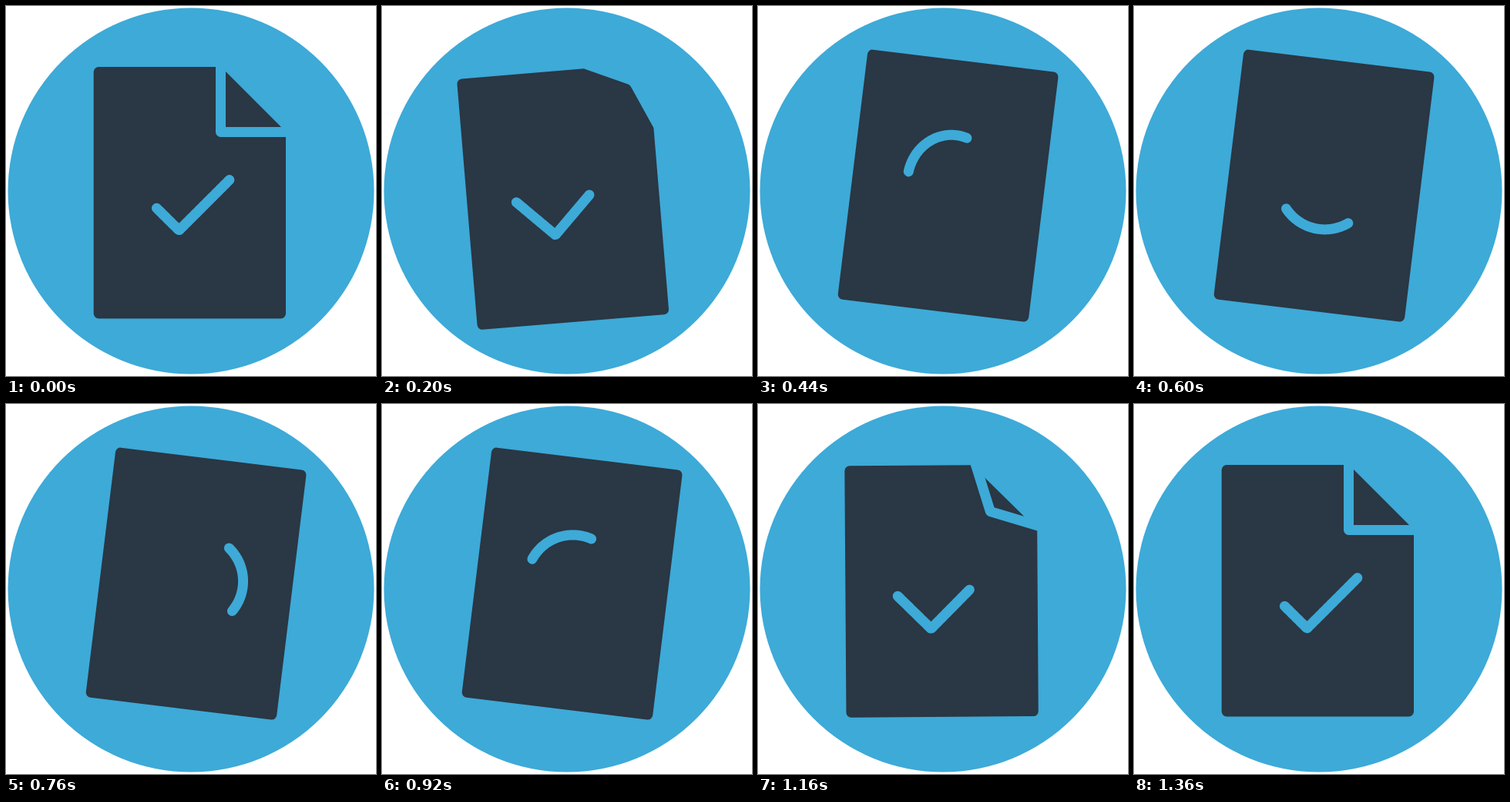
Animation, 480 px wide and 480 px high, one loop 1400 ms. Source, as an HTML page with a canvas:

```html
<!DOCTYPE html>
<html lang="en">
<head>
<meta charset="utf-8">
<title>Document check</title>
<style>
html, body { margin: 0; width: 100%; height: 100%; overflow: hidden; background: #fff; }
canvas { display: block; width: 480px; height: 480px; }
</style>
</head>
<body>
<canvas id="stage" width="480" height="480"></canvas>
<script>
const ctx = document.getElementById('stage').getContext('2d');
const BLUE = '#3daad8', DARK = '#2a3744';
const LOOP = 1400, STEP = 40, LINE = 13;
const RAD = Math.PI / 180;

const clamp = v => Math.min(1, Math.max(0, v));
const mix = (a, b, k) => a + (b - a) * k;
const ease = {
  lin: k => k,
  inOut: k => k * k * (3 - 2 * k),
  out: k => 1 - (1 - k) ** 2,
  out3: k => 1 - (1 - k) ** 3
};

// Track rows: [time, value, easing towards this row]
function track(rows, t) {
  for (let i = 1; i < rows.length; i++) {
    const [t0, v0] = rows[i - 1], [t1, v1, e = 'inOut'] = rows[i];
    if (t <= t1) return mix(v0, v1, ease[e](clamp((t - t0) / (t1 - t0))));
  }
  return rows[rows.length - 1][1];
}

const TILT = [[0, 0], [160, -6], [370, 7], [920, 7], [1050, -6], [1180, 0]];
const UNFOLD = [[40, 0], [400, 1, 'out'], [960, 1], [1268, 0]];

// Distance of both dash ends along the track; 0 is where the ring meets the tick
const TICK_TAIL = [[0, 22.6], [190, -2.5], [210, -2.5], [330, 85]];
const TICK_HEAD = [[0, 156], [190, 131.6], [210, 131.6], [330, 215]];
const TAIL = [[320, -609], [600, -342, 'lin'], [920, -119, 'lin'], [1160, 3, 'lin'], [1380, 22.6, 'out3']];
const HEAD = [[320, -496], [600, -251, 'lin'], [920, -30, 'lin'], [1160, 134.5, 'lin'], [1380, 156, 'out3']];

const RING = { x: 238.9, y: 239, r: 60, join: 173 };
const ELBOW = [224.5, 291];
const ENTRY = [RING.x + RING.r * Math.cos(RING.join * RAD), RING.y + RING.r * Math.sin(RING.join * RAD)];
const ARM = Math.hypot(ELBOW[0] - ENTRY[0], ELBOW[1] - ENTRY[1]);

function tickPoint(d) {
  if (d < ARM) return [mix(ENTRY[0], ELBOW[0], d / ARM), mix(ENTRY[1], ELBOW[1], d / ARM)];
  const s = (d - ARM) * Math.SQRT1_2;
  return [ELBOW[0] + s, ELBOW[1] - s];
}

// The ring starts as a narrow leaning ellipse and settles into a circle
function ringPoint(d, round) {
  const a = RING.join * RAD - d / RING.r;
  const x = mix(35, RING.r, round) * Math.cos(a);
  const y = mix(62, RING.r, round) * Math.sin(a);
  const lean = -5.2 * RAD * (1 - round), c = Math.cos(lean), s = Math.sin(lean);
  return [mix(252.5, RING.x, round) + x * c - y * s, mix(222, RING.y, round) + x * s + y * c];
}

function dashPoint(k, t) {
  if (t >= 320) {
    const d = mix(track(TAIL, t), track(HEAD, t), k);
    return d < 0 ? ringPoint(d, ease.inOut(clamp((t - 320) / 160))) : tickPoint(d);
  }
  const a = tickPoint(mix(track(TICK_TAIL, t), track(TICK_HEAD, t), k));
  const w = clamp((t - 200) / 120) ** 2;
  if (!w) return a;
  const b = ringPoint(mix(TAIL[0][1], HEAD[0][1], k), 0);
  return [mix(a[0], b[0], w), mix(a[1], b[1], w)];
}

function strokeLine(points, width, cap) {
  ctx.beginPath();
  for (const p of points) ctx.lineTo(...p);
  ctx.lineWidth = width;
  ctx.lineCap = cap;
  ctx.lineJoin = 'round';
  ctx.strokeStyle = BLUE;
  ctx.stroke();
}

function drawPage(s) {
  const L = 113.7, T = 79, R = 363, B = 405.5, r = 6.5;
  const tip = [mix(278.5, R, s), mix(163.5, T, s)];
  ctx.beginPath();
  ctx.moveTo(279, T);
  if (s > 0.5) ctx.arcTo(...tip, R, 163, r);
  ctx.lineTo(R, 163);
  ctx.arcTo(R, B, L, B, r);
  ctx.arcTo(L, B, L, T, r);
  ctx.arcTo(L, T, R, T, r);
  ctx.closePath();
  ctx.fillStyle = DARK;
  ctx.fill();
  const crease = LINE * clamp((0.55 - s) / 0.1);
  if (crease > 0) strokeLine([[278.5 + 19 * s, T], tip, [R, 163.5 - 19 * s]], crease, 'square');
}

function draw(t) {
  ctx.fillStyle = '#fff';
  ctx.fillRect(0, 0, 480, 480);
  ctx.beginPath();
  ctx.arc(240, 240, 237.5, 0, 2 * Math.PI);
  ctx.fillStyle = BLUE;
  ctx.fill();

  const tilt = track(TILT, t);
  const [dx, dy] = tilt > 0 ? [1.18, -1.31] : [0.76, -1.06];
  ctx.save();
  ctx.translate(238.4 + dx * tilt, 242.2 + dy * tilt);
  ctx.rotate(tilt * RAD);
  ctx.translate(-238.4, -242.2);
  drawPage(track(UNFOLD, t));
  const n = 90;
  strokeLine(Array.from({ length: n + 1 }, (_, i) => dashPoint(i / n, t)), LINE, 'round');
  ctx.restore();
}

let start;
function tick(now) {
  start ??= now;
  draw(Math.floor((now - start + 2) / STEP) * STEP % LOOP);
  requestAnimationFrame(tick);
}
draw(0);
requestAnimationFrame(tick);
</script>
</body>
</html>
```
